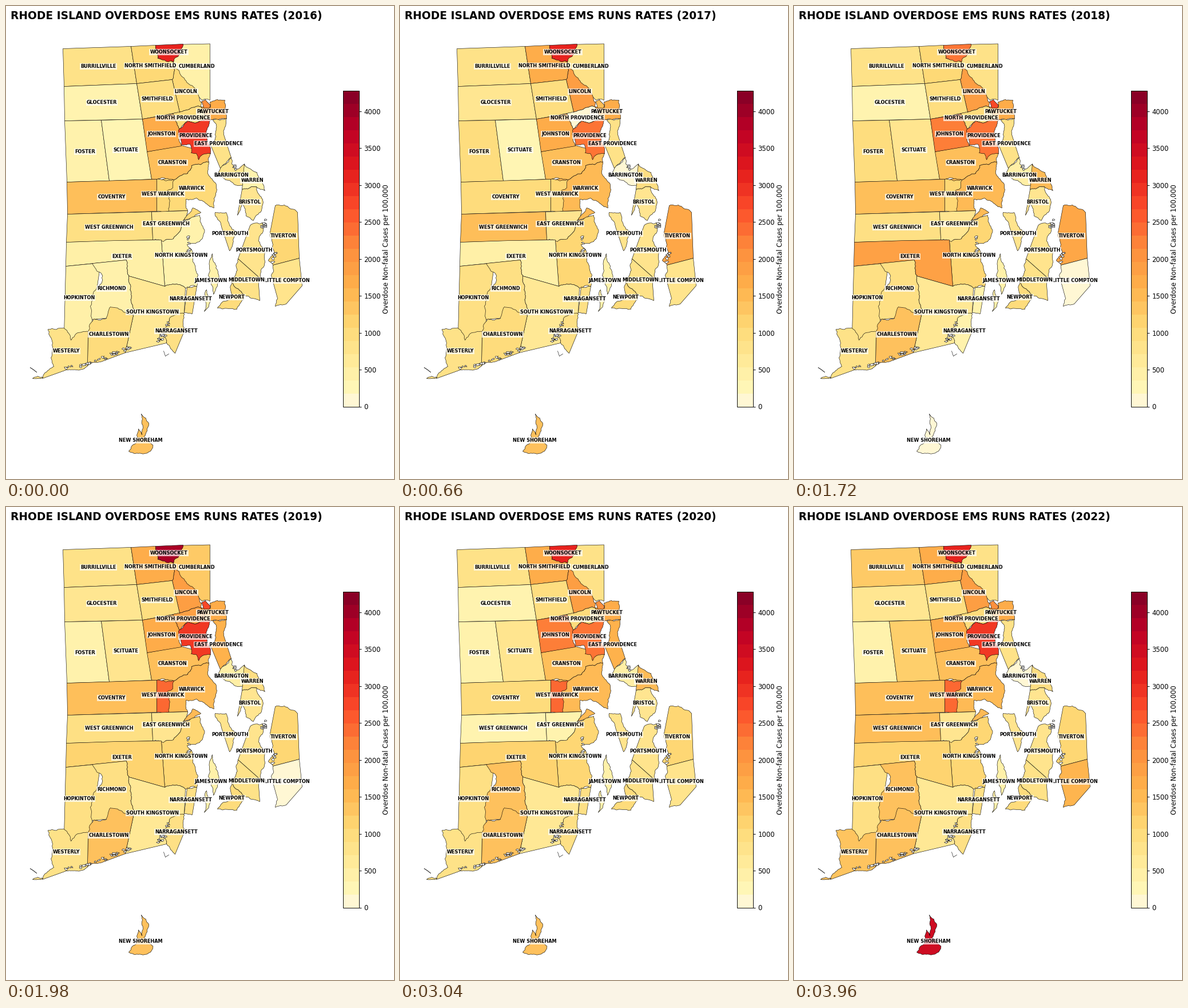
These frames come from a looping animation (678 px wide and 826 px high, 4620 ms). A matplotlib script:

```python
import random
import numpy as np
import matplotlib.pyplot as plt
from matplotlib.animation import FuncAnimation
from matplotlib.collections import PolyCollection
from matplotlib.patches import Rectangle

W, H, DPI = 678, 826, 72      # at 72 dpi one point is one pixel
YEARS = range(2016, 2023)
TOP_RATE, BANDS = 4280, 24
LINE = 0.58
STRAIGHT = 41                 # longer edges are surveyed lines, not coast
CREAM = (1, 0.967, 0.83)
CMAP = plt.get_cmap("YlOrRd")

fig = plt.figure(figsize=(W / DPI, H / DPI), dpi=DPI, facecolor="white")
ax = fig.add_axes([0, 0, 1, 1])
ax.set_xlim(-0.5, W - 0.5)
ax.set_ylim(H - 0.5, -0.5)
ax.axis("off")


def rate_color(rate):
    if rate < TOP_RATE / BANDS:
        return CREAM
    return CMAP(min(rate / TOP_RATE, 1.0))[:3]


def ragged(a, b, depth=4):
    """Midpoint displacement; the same edge gives the same line both ways."""
    (x1, y1), (x2, y2) = a, b
    if depth == 0 or np.hypot(x2 - x1, y2 - y1) < 3:
        return [a]
    rng = random.Random(str(sorted([a, b])))
    k = rng.uniform(-0.14, 0.14) * (1 if a < b else -1)
    mid = ((x1 + x2) / 2 - k * (y2 - y1), (y1 + y2) / 2 + k * (x2 - x1))
    return ragged(a, mid, depth - 1) + ragged(mid, b, depth - 1)


def outline(corners):
    pts = list(zip(corners[::2], corners[1::2]))
    out = []
    for a, b in zip(pts, pts[1:] + pts[:1]):
        long = np.hypot(b[0] - a[0], b[1] - a[1]) > STRAIGHT
        out += [a] if long else ragged(a, b)
    return out


shapes, series, labels = [], [], []


def town(name, spots, base, *parts, swing=0.5, low=(), high=()):
    """Paint over earlier towns; the rate swings off its base in some years."""
    labels.extend((name, x, y) for x, y in spots)
    rates = {y: base * (1 + swing * ((y % 100 in high) - (y % 100 in low)))
             for y in YEARS}
    for part in parts:
        shapes.append(outline(part))
        series.append(rates)


# North
town("BURRILLVILLE", [(161, 105)], 850,
     (99, 74, 218, 70, 228, 135, 101, 140), high=[22])
town("GLOCESTER", [(167, 168)], 720,
     (101, 140, 228, 135, 238, 197, 102, 200), low=[16, 18, 20], high=[21])
town("FOSTER", [(138, 254)], 980,
     (102, 200, 166, 199, 180, 305, 106, 307),
     swing=0.6, low=[16, 19, 20, 22])
town("SCITUATE", [(209, 251)], 760,
     (166, 199, 238, 197, 254, 302, 180, 305),
     swing=0.6, low=[16, 17], high=[22])
town("CUMBERLAND", [(333, 105)], 850,
     (290, 67, 356, 65.5, 356, 164, 342, 164, 290, 110), low=[16], high=[19])
town("LINCOLN", [(314, 149)], 1900,
     (292, 97, 314, 130, 332, 150, 341, 176, 303, 185, 290, 128),
     swing=0.43, low=[16])
town("NORTH SMITHFIELD", [(252, 104)], 1080,
     (218, 70, 261, 68, 265, 91, 292, 97, 290, 128, 228, 135),
     swing=0.55, high=range(17, 23, 1), low=[18])
town("WOONSOCKET", [(284, 80)], 3120,
     (261, 68, 309, 66, 303, 84, 292, 97, 279, 96, 265, 91),
     swing=0.25, low=[18], high=[19, 21])
town("SMITHFIELD", [(264, 162)], 950,
     (228, 135, 290, 128, 303, 185, 238, 197))

# Around the capital
town("CRANSTON", [(291, 273)], 1430,
     (246, 254, 306, 243, 357, 257, 354, 272, 324, 278, 317, 292, 293, 303,
      254, 302))
town("JOHNSTON", [(271, 223)], 1700,
     (238, 197, 291, 188, 303, 214, 302, 234, 306, 244, 246, 254),
     swing=0.33, high=[18, 20])
town("NORTH PROVIDENCE", [(309, 195)], 1000,
     (291, 188, 303, 185, 341, 176, 357, 198, 317, 200, 303, 214),
     swing=0.85, low=[17], high=[19])
town("PAWTUCKET", [(361, 184)], 1700,
     (341, 176, 357, 176, 356, 167, 382, 164, 385, 196, 357, 198))
town("", [], 2100,
     (341, 167, 348, 163, 357, 172, 356, 177, 345, 178),
     swing=0.3, low=[17], high=[18, 19])
town("PROVIDENCE", [(331, 226)], 2900,
     (301, 216, 317, 200, 357, 198, 351, 231, 357, 257, 343, 259, 336, 268,
      332, 257, 323, 256, 321, 241, 306, 242),
     swing=0.19, low=[17, 18, 20])
town("EAST PROVIDENCE", [(371, 240)], 850,
     (361, 198, 385, 196, 380, 224, 393, 264, 374, 283, 357, 242, 366, 228),
     swing=0.9, high=[19, 20, 21])
town("COVENTRY", [(184, 333)], 1430,
     (106, 307, 263, 302, 263, 358, 107, 363), swing=0.3, low=[17, 20])
town("WARWICK", [(324, 318)], 1500,
     (270, 303, 293, 303, 317, 292, 324, 278, 354, 272, 352, 292, 368, 320,
      363, 352, 350, 345, 332, 335, 314, 337, 317, 357, 270, 358),
     (309, 374, 326, 352, 340, 360), swing=0.3, low=[16], high=[21])
town("WEST WARWICK", [(274, 328)], 2450,
     (263, 302, 293, 303, 291, 317, 280, 324, 284, 358, 263, 358),
     swing=0.55, low=[16, 17, 18])

# South
town("WEST GREENWICH", [(180, 386)], 900,
     (107, 363, 254, 359, 256, 408, 105, 412),
     swing=0.6, low=[20, 21], high=[17, 22])
town("NORTH KINGSTOWN", [(306, 435)], 1100,
     (271, 408, 292, 406, 309, 374, 338, 365, 343, 405, 316, 416, 326, 435,
      335, 470, 333, 489, 313, 492, 277, 489), swing=0.65, low=[16])
town("EAST GREENWICH", [(279, 380)], 750,
     (254, 359, 317, 357, 309, 374, 292, 406, 256, 408), low=[20, 21])
town("EXETER", [(202, 437)], 1150,
     (105, 412, 194, 409, 271, 408, 277, 489, 214, 471, 210, 443, 104, 454),
     swing=0.6, low=[16, 17], high=[18])
town("HOPKINTON", [(127, 509)], 900,
     (104, 454, 165, 448, 147, 570, 113, 583, 101, 573), low=[16, 21])
town("SOUTH KINGSTOWN", [(256, 534)], 680,
     (214, 471, 277, 489, 313, 492, 311, 535, 285, 546, 280, 588, 208, 605,
      222, 540, 218, 503))
town("RICHMOND", [(184, 493)], 900,
     (151, 449, 210, 443, 214, 471, 218, 503, 222, 540, 150, 547, 147, 524,
      154, 497, 168, 470), swing=0.55, low=[16], high=[20, 22])
town("CHARLESTOWN", [(179, 573)], 1000,
     (143, 568, 153, 546, 175, 545, 182, 525, 197, 529, 222, 540, 208, 605,
      165, 621, 142, 628), swing=0.4, high=[18, 19, 20, 22])
town("WESTERLY", [(105, 602)], 850,
     (73, 564, 101, 562, 113, 583, 123, 571, 143, 568, 142, 628, 105, 635,
      63, 650, 83, 629, 81, 598),
     (46, 650, 55, 646, 64, 648), swing=0.6, high=[21, 22])
town("NARRAGANSETT", [(322, 511), (297, 567)], 880,
     (316, 490, 333, 489, 325, 537, 311, 535),
     (285, 546, 311, 537, 312, 565, 295, 606, 280, 588, 275, 572),
     swing=0.55, low=[18], high=[21])

# Bay and islands
town("BARRINGTON", [(393, 295)], 480,
     (393, 264, 400, 285, 415, 276, 413, 313, 394, 307, 370, 290),
     swing=0.7, low=[17, 21, 22], high=[16])
town("WARREN", [(430, 304)], 920,
     (416, 275, 438, 290, 452, 322, 437, 315, 412, 320),
     swing=0.6, low=[16], high=[18, 20, 21])
town("BRISTOL", [(425, 342)], 750,
     (412, 320, 437, 315, 447, 352, 432, 374, 419, 366, 411, 343, 404, 365))
town("PORTSMOUTH", [(391, 397), (433, 426)], 780,
     (365, 360, 384, 360, 403, 395, 390, 427, 376, 385),
     (405, 441, 426, 383, 447, 378, 441, 410, 452, 445, 445, 478, 440, 472))
town("MIDDLETOWN", [(420, 478)], 850,
     (405, 441, 440, 472, 443, 514, 416, 505, 393, 478))
town("NEWPORT", [(394, 508)], 1000,
     (393, 478, 416, 505, 403, 529, 369, 527, 380, 515, 396, 508),
     swing=0.25, high=[21])
town("JAMESTOWN", [(358, 479)], 430,
     (360, 432, 370, 465, 362, 503, 353, 470), (350, 495, 357, 515, 346, 533),
     swing=0.65, low=[21])
town("TIVERTON", [(484, 401)], 1100,
     (470, 348, 509, 360, 512, 440, 466, 452, 458, 444, 468, 432, 460, 400),
     swing=0.6, high=[17, 18, 21])
town("LITTLE COMPTON", [(490, 479)], 800,
     (466, 452, 512, 440, 517, 488, 489, 520, 470, 524, 474, 510, 463, 470),
     swing=0.95, low=[18, 19], high=[22])
town("NEW SHOREHAM", [(235, 758)], 1400,
     (236, 712, 249, 728, 241, 752, 256, 766, 252, 777, 214, 777, 228, 760,
      231, 738, 237, 748, 239, 735), swing=1.5, low=[18, 21], high=[22])

towns = PolyCollection(shapes, edgecolors="black", linewidths=LINE, zorder=1)
ax.add_collection(towns)


def ponds(start, end, spread, count):
    """Small ragged patches of water scattered along a line."""
    rng = np.random.default_rng(start[0])
    turn = np.linspace(0, 2 * np.pi, 9)[:-1]
    polys = []
    for t in rng.random(count):
        center = np.add(np.multiply(start, 1 - t), np.multiply(end, t))
        center = center + rng.uniform(-spread, spread, 2)
        size = rng.uniform(0.6, 3.4, turn.size)
        polys.append(center + np.c_[1.2 * size * np.cos(turn),
                                    0.8 * size * np.sin(turn)])
    ax.add_collection(PolyCollection(polys, facecolors="white", zorder=2,
                                     edgecolors="black", linewidths=LINE))


ponds((100, 633), (148, 623), 2, 10)     # south coast
ponds((148, 623), (215, 597), 3, 18)
ponds((266, 588), (284, 553), 5, 16)
ponds((316, 402), (318, 426), 3, 5)      # bay shores
ponds((398, 268), (401, 290), 3, 4)
ponds((448, 386), (455, 374), 4, 8)
ponds((470, 430), (462, 452), 2, 6)
ax.plot([42, 48, 53], [631, 635, 639], color="black", lw=0.9)
ax.plot([275, 278, 284], [602, 611, 607], color="black", lw=LINE)

# Western labels lie over eastern ones
for name, x, y in sorted(labels, key=lambda item: -item[1]):
    ax.text(x, y, name, size=8.17, weight="bold", ha="center", va="center",
            zorder=4, bbox=dict(boxstyle="square,pad=0.15", fc="white",
                                ec="none", alpha=0.7))

# Colour scale
LEFT, RIGHT, TOP, BOTTOM = 588.5, 616.5, 147, 699
band = (BOTTOM - TOP) / BANDS
for k in range(BANDS):
    ax.add_patch(Rectangle((LEFT, BOTTOM - (k + 1) * band), RIGHT - LEFT, band,
                           fc=rate_color((k + 0.5) * TOP_RATE / BANDS), lw=0,
                           antialiased=False))
ax.add_patch(Rectangle((LEFT, TOP), RIGHT - LEFT, BOTTOM - TOP, fill=False,
                       ec="black", lw=0.93, zorder=3))
for rate in range(0, 4001, 500):
    y = BOTTOM - rate / TOP_RATE * (BOTTOM - TOP)
    ax.plot([RIGHT, RIGHT + 4.1], [y, y], color="black", lw=0.93,
            solid_capstyle="butt")
    ax.text(RIGHT + 8.2, y, str(rate), size=11.67, va="center_baseline")
ax.text(664, 423.5, "Overdose Non-fatal Cases per 100,000", size=11.67,
        rotation=90, ha="center", va="center")

title = ax.text(7.3, 22.5, "", size=18.62, weight="bold")


def update(i):
    year = YEARS[i]
    towns.set_facecolor([rate_color(rates[year]) for rates in series])
    title.set_text(f"RHODE ISLAND OVERDOSE EMS RUNS RATES ({year})")
    return towns, title


anim = FuncAnimation(fig, update, frames=len(YEARS), interval=660, repeat=True)
plt.show()
```
